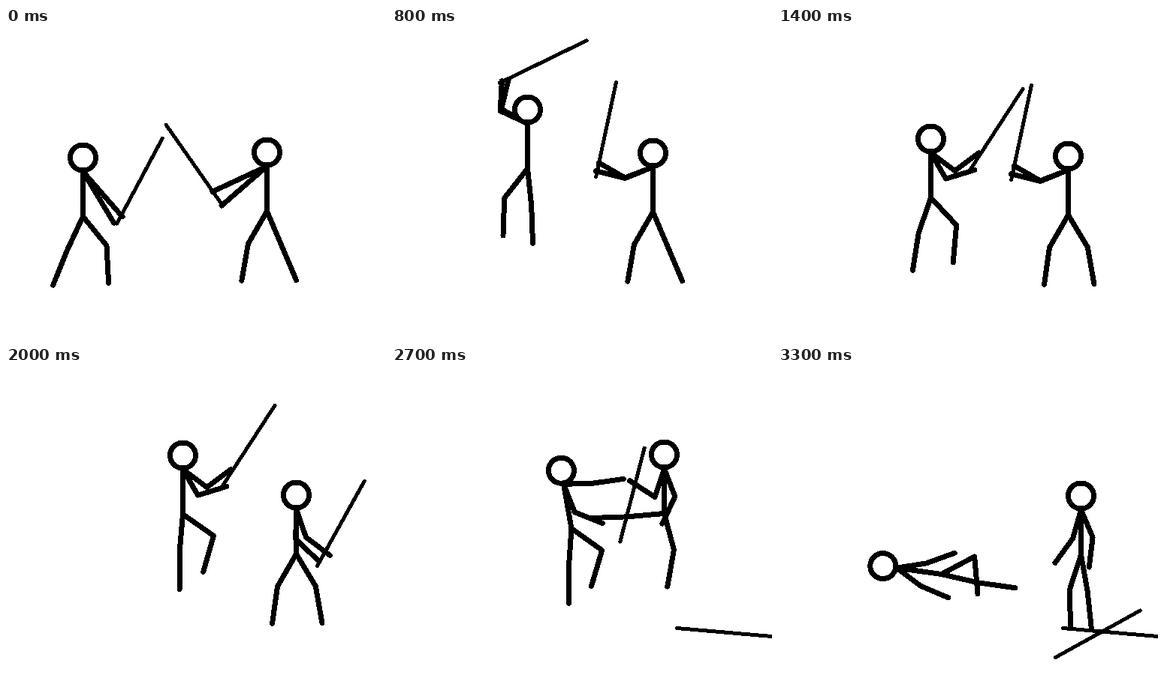
These frames come from a looping animation (506x415 px, 3.4 s). An HTML page:

```html
<!DOCTYPE html>
<html lang="en">
<head>
<meta charset="utf-8">
<title>Stick duel</title>
<style>
  html, body { margin: 0; width: 100%; height: 100%; overflow: hidden; background: #fff; }
  svg { display: block; width: 506px; height: 415px; }
  path, circle {
    fill: none; stroke: #000; stroke-width: 7;
    stroke-linecap: round; stroke-linejoin: round; shape-rendering: crispEdges;
  }
  circle { fill: #fff; }
  .sword { stroke-width: 5; }
</style>
</head>
<body>
<svg viewBox="0 0 506 415"><g id="stage" transform="translate(.5 .5)"></g></svg>
<script>
const LOOP = 3400, STEP = 100;
const BONE = { torso: 60, head: 18.5, leg: 50, arm: 40, sword: 129 };

// Angles are in degrees, 0 pointing right and 90 down; limbs list upper, lower, upper, lower.
// A sword sits at an offset from the second hand (hold) or flies free (grip).
function leftFighter() {
  const ready = { hip: [102, 251], lean: -90, legs: [115, 112, 51, 87],
    arms: [49, 49, 59, 59], hold: [4, 1], tilt: -62 };
  const strike = { hip: [180, 187], lean: -90, legs: [128, 92, 84, 88],
    arms: [-155, -87, -151, -76], hold: [-12, 4], tilt: -26, ease: windUp };
  const clash = { hip: [203, 226], lean: -90, legs: [109, 99, 47, 95],
    arms: [37, -37, 60, -17], hold: [-6, 0], tilt: -57 };
  const hop = { ...clash, hip: [235, 196], legs: [95, 90, 35, 106] };
  const raise = { ...hop, arms: [-15, -84, 18, -59], hold: [1, 0], tilt: -122 };
  const reel = { hip: [242, 234], lean: -110, legs: [93, 90, 36, 107],
    arms: [11, 68, 119, 103], grip: [312, 351], tilt: -29 };
  const fallen = { hip: [217, 276], lean: -172, legs: [13, 8, -28, 85],
    arms: [-9, -20, 37, 23], grip: [369, 387], tilt: -29 };
  return [[0, ready], [800, strike], [1200, clash], [1770, clash],
    [2000, hop], [2400, raise], [3000, reel], [3300, fallen]];
}

function rightFighter() {
  const ready = { hip: [347, 244], lean: -90, legs: [120, 100, 67, 67],
    arms: [155, 155, 139, 139], hold: [0, -2], tilt: -125 };
  const guard = { ...ready, hip: [347, 245], arms: [159, 210, 158, 194], hold: [0, 8], tilt: -78 };
  const step = { ...guard, hip: [386, 249], legs: [120, 98, 59, 80] };
  const low = { ...step, arms: [71, 37, 91, 44], tilt: -61 };
  const leap = { hip: [395, 177], lean: -90, legs: [98, 95, 61, 94],
    arms: [71, -34, 112, 64], grip: [437, 374], tilt: -61 };
  const land = { hip: [405, 247], lean: -90, legs: [170, 80, 82, 84],
    arms: [108, -147, 69, 115], grip: [379, 348], tilt: 5 };
  const kick = { ...land, hip: [362, 195], legs: [175, 178, 75, 100] };
  const stand = { ...land, hip: [403, 250], legs: [108, 88, 80, 84], arms: [106, -234, 67, 97] };
  return [[0, ready], [800, guard], [1300, step], [1400, step], [1800, low],
    [2000, low], [2400, leap], [2700, kick], [3000, land], [3300, stand]];
}

// Sinks back before springing forward.
function windUp(p) { return p * p * (4 * p - 3); }

const mix = (a, b, p) => Array.isArray(a) ? a.map((v, i) => mix(v, b[i], p)) : a + (b - a) * p;

function reach([x, y], length, degrees) {
  const r = degrees * Math.PI / 180;
  return [x + length * Math.cos(r), y + length * Math.sin(r)];
}

function limb(root, length, upper, lower) {
  const joint = reach(root, length, upper);
  return [root, joint, reach(joint, length, lower)];
}

function limbs(root, length, [a, b, c, d]) {
  return [limb(root, length, a, b), limb(root, length, c, d)];
}

function gripOf(pose) {
  if (pose.grip) return pose.grip;
  const neck = reach(pose.hip, BONE.torso, pose.lean);
  const hand = limbs(neck, BONE.arm, pose.arms)[1][2];
  return hand.map((v, i) => v + pose.hold[i]);
}

function poseAt(keys, t) {
  const next = keys.findIndex(([time]) => time > t);
  if (next < 0) return keys[keys.length - 1][1];
  const [t0, a] = keys[next - 1], [t1, b] = keys[next];
  const p = (t - t0) / (t1 - t0), bodyP = b.ease ? b.ease(p) : p;
  const pose = {
    hip: mix(a.hip, b.hip, bodyP), lean: mix(a.lean, b.lean, bodyP),
    legs: mix(a.legs, b.legs, bodyP), arms: mix(a.arms, b.arms, p),
    tilt: mix(a.tilt, b.tilt, p)
  };
  if (a.hold && b.hold) pose.hold = mix(a.hold, b.hold, p);
  else pose.grip = mix(gripOf(a), gripOf(b), p);
  return pose;
}

const line = points => 'M' + points.map(p => p.map(v => v.toFixed(2)).join(' ')).join('L');

function add(tag, attrs) {
  const el = document.createElementNS('http://www.w3.org/2000/svg', tag);
  for (const name in attrs) el.setAttribute(name, attrs[name]);
  return document.getElementById('stage').appendChild(el);
}

function makeFighter(keys) {
  const sword = add('path', { class: 'sword' });
  const body = add('path');
  const head = add('circle', { r: 17 });
  return t => {
    const pose = poseAt(keys, t);
    const neck = reach(pose.hip, BONE.torso, pose.lean);
    const [cx, cy] = reach(neck, BONE.head, pose.lean);
    const grip = gripOf(pose);
    const bones = [[pose.hip, neck],
      ...limbs(pose.hip, BONE.leg, pose.legs), ...limbs(neck, BONE.arm, pose.arms)];
    body.setAttribute('d', bones.map(line).join(''));
    head.setAttribute('cx', cx);
    head.setAttribute('cy', cy);
    sword.setAttribute('d', line([grip, reach(grip, BONE.sword, pose.tilt)]));
  };
}

const fighters = [leftFighter(), rightFighter()].map(makeFighter);
const start = performance.now();

function draw() {
  const t = Math.max(0, performance.now() - start) % LOOP;
  const held = Math.floor(t / STEP) * STEP;
  fighters.forEach(show => show(held));
  requestAnimationFrame(draw);
}
draw();
</script>
</body>
</html>
```
